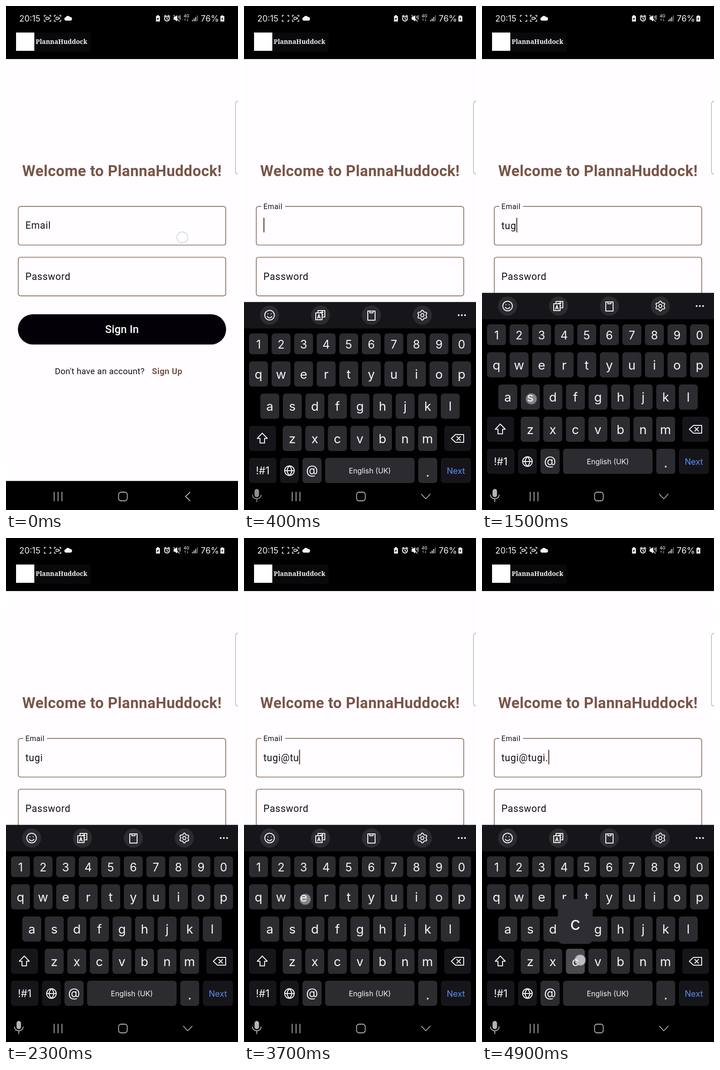
Animation, 508 px wide and 1102 px high, one loop 5000 ms. Source, as an HTML page:

```html
<!DOCTYPE html>
<html lang="en">
<head>
<meta charset="utf-8">
<title>Sign in</title>
<style>
  html, body { margin: 0; width: 100%; height: 100%; overflow: hidden; background: #000; }
  svg { display: block; width: 100vw; height: 100vh; font-family: Roboto, sans-serif; }
  .system { font-family: Inter, sans-serif; }
  .field { fill: none; stroke: #74543f; stroke-width: 1.4; }
  .body { font-size: 21.2px; letter-spacing: .66px; fill: #121014; }
  .small { font-size: 18.5px; letter-spacing: .33px; }
  .brown { fill: #795548; font-weight: 700; }
  .line { fill: none; stroke: #f2f2f4; stroke-width: 2; stroke-linecap: round; stroke-linejoin: round; }
  .nav { fill: none; stroke: #b4b4b6; stroke-width: 1.8; stroke-linecap: round; stroke-linejoin: round; }
  .mid { text-anchor: middle; }
</style>
</head>
<body>
<svg viewBox="0 0 508 1102" preserveAspectRatio="none">
  <rect width="508" height="1102" fill="#fffdff"/>
  <rect width="508" height="116"/>

  <!-- status bar -->
  <g class="system" fill="#f4f4f4">
    <text x="29" y="33.500" font-size="18.300">20:15</text>
    <path id="corners" d="M84 24v-3.500h3.500M94.500 20.500h3.500v3.500M98 30v3.500h-3.500M87.500 33.500h-3.500v-3.500" fill="none" stroke="#f4f4f4" stroke-width="1.5"/>
    <use href="#corners" x="22"/>
    <g id="blink">
      <g id="camera">
        <path d="M87.500 24.500h5v5h-5z" fill="none" stroke="#f4f4f4" stroke-width="1.4"/>
        <path d="M93 27l3-2.500v5z"/>
      </g>
    </g>
    <use href="#camera" x="22"/>
    <path d="M131 32a3.800 3.800 0 0 1 0-7.500a5 5 0 0 1 9-.5a4 4 0 0 1 1 8z"/>
    <path d="M328.500 22h2v-2h4v2h2.500v12h-8.500z"/>
    <path d="M330.500 29.500q0-3 4-4q0 5-4 4" fill="#000"/>
    <circle cx="352.500" cy="27.500" r="5.300" fill="none" stroke="#f4f4f4" stroke-width="2"/>
    <path d="M346 23l4-3M355 20l4 3M352.500 24v4l2.500 1.500" fill="none" stroke="#f4f4f4" stroke-width="1.700"/>
    <path d="M367 24h3l5-4v14l-5-4h-3z"/>
    <path d="M367 20l13 14M378 22v4M381 20v10" fill="none" stroke="#f4f4f4" stroke-width="1.5"/>
    <text x="389" y="25" font-size="8.800" font-weight="500">4G</text>
    <path d="M392.500 33v-5l-2 2M397 27.500v5l2-2" fill="none" stroke="#888" stroke-width="1.2"/>
    <path d="M407.500 30.500h1.800v3h-1.800zM411 27.500h1.800v6h-1.800zM414.500 24h1.800v9.500h-1.800z"/>
    <path d="M418 20.500h1.800v13h-1.800z" fill="#777"/>
    <text x="426.500" y="33.500" font-size="18.500">76%</text>
    <path d="M469.500 22h2v-1.500h4v1.500h2.500v12h-8.500z"/>
    <path d="M474.500 24l-3 4.500h2l-.7 3.500l3-4.500h-2z" fill="#000"/>
  </g>

  <!-- header -->
  <rect x="62" y="58" width="123" height="42" fill="#09080b"/>
  <rect x="22" y="58" width="40" height="40" fill="#fff"/>
  <text x="65" y="83" font-size="14" font-weight="600" fill="#f4f4f4" style="font-family:'Noto Serif',serif">PlannaHuddock</text>

  <rect x="502.500" y="208" width="20" height="160" rx="6" fill="#fff" stroke="#aaa8ac" stroke-width="1.3"/>

  <!-- form -->
  <text class="brown mid" x="254" y="372" font-size="33" letter-spacing=".4">Welcome to PlannaHuddock!</text>
  <rect class="field" x="26.800" y="438.300" width="454.400" height="84.300" rx="5"/>
  <rect class="field" x="26.800" y="549.400" width="454.400" height="84.300" rx="5"/>
  <rect id="notch" x="38" y="436" height="5" fill="#fffdff"/>
  <text id="label" class="body" x="42.500">Email</text>
  <text id="typed" class="body" x="42.500" y="488"></text>
  <rect id="caret" y="463" width="2.600" height="32" fill="#795548"/>
  <text class="body" x="42.500" y="598.500">Password</text>
  <rect x="27" y="676" width="454" height="66" rx="33" fill="#e4e2e5"/>
  <rect x="26" y="674" width="456" height="66" rx="33" fill="#030107"/>
  <text class="mid" x="254" y="715" font-size="23.800" font-weight="500" letter-spacing=".13" fill="#fff">Sign In</text>
  <text class="small" x="107" y="805" fill="#121014">Don't have an account?</text>
  <text class="small brown" x="319.500" y="805">Sign Up</text>

  <rect y="1038.500" width="508" height="64"/>
  <g id="keyboard" class="system"></g>

  <!-- navigation bar -->
  <g class="nav">
    <path d="M105.500 1063v19M114 1063v19M122.500 1063v19"/>
    <rect x="246.500" y="1063" width="19" height="19" rx="5.500"/>
    <path id="back" d="M403 1063l-10 9.500l10 9.500"/>
    <g id="mic">
      <rect x="24" y="1057" width="8" height="16" rx="4" fill="#b4b4b6"/>
      <path d="M18.500 1069a9.500 8.500 0 0 0 19 0M28 1078v6"/>
    </g>
  </g>
  <circle id="touch" r="12" fill="#fff" stroke="#8290b4" stroke-width="1.3"/>
</svg>
<script>
const LOOP = 5000, STEP = 100;
const DARK = '#16151a', KEY = '#2c2b30', PRESSED = '#4b4a4f', INK = '#f4f4f6';
const $ = id => document.getElementById(id);

function add(parent, tag, attrs, text) {
  const el = document.createElementNS('http://www.w3.org/2000/svg', tag);
  for (const name in attrs) el.setAttribute(name, attrs[name]);
  if (text) el.textContent = text;
  parent.append(el);
  return el;
}

const board = $('keyboard');
const keys = {};

function addKey(name, x, y, w, h, fill, size, baseline, color = INK) {
  const rect = add(board, 'rect', { x, y, width: w, height: h, rx: 6.5, fill });
  if (size) add(board, 'text', { x: x + w / 2, y: y + baseline, 'font-size': size, fill: color, class: 'mid' }, name);
  keys[name] = { rect, fill, cx: x + w / 2, y };
}

function addRow(letters, x, y, h, size, baseline) {
  [...letters].forEach((c, i) => addKey(c, x + i * 49.4, y, 41.5, h, KEY, size, baseline));
}

const icon = d => add(board, 'path', { d, class: 'line' });

function buildKeyboard() {
  add(board, 'rect', { y: 627.5, width: 508, height: 540 });
  add(board, 'rect', { y: 627.5, width: 508, height: 57.5, fill: DARK });
  for (const cx of [56, 167.5, 279, 390.5]) add(board, 'circle', { cx, cy: 656, r: 21, fill: KEY });
  for (const cx of [470, 477, 484]) add(board, 'circle', { cx, cy: 656, r: 2, fill: INK });

  // smile, translate, clipboard, gear
  icon('M45.500 656a10.500 10.500 0 1 1 21 0a10.500 10.500 0 1 1-21 0M51 659q5 6 10 0M52.500 653v.2M59.500 653v.2');
  icon('M162 650v-4h15v14h-4M157 651h14v15h-14zM161 663l3-8.500l3 8.500M162 660.500h4M167 650h6l-2-2M173 655l-2 2');
  icon('M271 647h16v20h-16zM275.500 647v4h7v-4');
  let gear = '';
  for (let i = 0; i < 48; i++) {
    const a = i * Math.PI / 24, r = 9.3 + 1.5 * Math.cos(6 * a);
    gear += `${i ? 'L' : 'M'}${390.5 + r * Math.sin(a)} ${656 - r * Math.cos(a)}`;
  }
  icon(gear + 'ZM387 656a3.500 3.500 0 1 1 7 0a3.500 3.500 0 1 1-7 0');

  addRow('1234567890', 11, 696, 45.5, 25.2, 32.5);
  addRow('qwertyuiop', 11, 757, 55, 27.6, 37.5);
  addRow('asdfghjkl', 35.7, 827.5, 55, 27.6, 37.5);
  addRow('zxcvbnm', 84.8, 898, 55, 27.6, 37.5);
  addKey('shift', 11, 898, 59, 55, DARK);
  addKey('erase', 438.5, 898, 58.5, 55, DARK);
  addKey('!#1', 11, 968, 60, 55, DARK, 22.5, 36);
  addKey('globe', 79, 968, 41, 55, DARK);
  addKey('@', 128, 968, 42, 55, KEY, 27, 36);
  addKey('English (UK)', 177.5, 968, 196, 55, KEY, 15.8, 34);
  addKey('.', 381.5, 968, 41.5, 55, KEY, 28, 41);
  addKey('Next', 431, 968, 66, 55, DARK, 18.2, 34.5, '#5c8ff7');

  icon('M40 914l-11 11.500h6v10h10v-10h6z');
  icon('M463 917h18v17h-18l-9-8.500zM466 921.500l8 8M474 921.500l-8 8');
  icon('M89 996a10.500 10.500 0 1 1 21 0a10.500 10.500 0 1 1-21 0M89.500 996h20M99.500 985.500q-10 10.500 0 21q10-10.500 0-21');
}
buildKeyboard();

const popup = add(board, 'g', {});
add(popup, 'rect', { x: -38, width: 76, height: 98, rx: 11, fill: '#2e2d32' });
const popupText = add(popup, 'text', { y: 67, 'font-size': 40, fill: INK, class: 'mid' });

// key, down, up, gone, touch x, touch y, typed character
const taps = [
  ['', 0, 0, 200, 386, 506, ''],
  ['t', 800, 1000, 1100, 239, 794, 't'],
  ['e', 1100, 1200, 1400, 134, 790, 'u'],
  ['s', 1400, 1500, 1700, 108, 859, 'g'],
  ['t', 1700, 1800, 2000, 225, 784, 'i'],
  ['@', 3100, 3100, 3300, 150, 992, '@'],
  ['t', 3400, 3500, 3600, 233, 789, 't'],
  ['e', 3600, 3700, 3800, 134, 790, 'u'],
  ['s', 3800, 3900, 4000, 109, 859, 'g'],
  ['t', 4000, 4100, 4300, 235, 789, 'i'],
  ['.', 4500, 4600, 4800, 404, 994, '.'],
  ['c', 4900, 5000, 5000, 215, 923, '']
].map(([key, down, up, gone, x, y, char]) => ({ key, down, up, gone, x, y, char }));

// one value per step while the keyboard opens
const opening = {
  slide: [480, 475, 270, 66, 20, 5, 0],
  label: [0, .3, .95, 1],
  turn: [0, 0, .5, 1],
  mic: [0, 0, .3, .6, .8, .9, 1]
};
const stepOf = (name, i) => opening[name][Math.min(i, opening[name].length - 1)];
const show = (el, on) => el.setAttribute('visibility', on ? 'visible' : 'hidden');

function drawTap(t) {
  const tap = taps.find(p => p.down <= t && t < p.gone);
  const held = tap && t < tap.up;
  for (const name in keys) {
    keys[name].rect.setAttribute('fill', held && name === tap.key ? PRESSED : keys[name].fill);
  }
  show(popup, held);
  if (held) {
    const key = keys[tap.key];
    popup.setAttribute('transform', `translate(${key.cx} ${key.y - 108.5})`);
    popupText.textContent = tap.key;
  }
  show($('touch'), tap);
  if (tap) {
    $('touch').setAttribute('cx', tap.x);
    $('touch').setAttribute('cy', tap.y);
    $('touch').setAttribute('opacity', held ? .64 : t - tap.up < STEP ? .43 : .25);
  }
}

function drawInput(t) {
  const done = taps.filter(p => p.char && p.up <= t);
  const lastEdit = done.length ? done[done.length - 1].up : 300;
  $('typed').textContent = done.map(p => p.char).join('');
  const width = done.length ? $('typed').getComputedTextLength() : 0;
  $('caret').setAttribute('x', 42.3 + width);
  show($('caret'), t >= 300 && Math.floor((t - lastEdit) / 500) % 2 === 0);
}

function draw(now) {
  const i = Math.floor(now % LOOP / STEP), t = i * STEP;
  board.setAttribute('transform', `translate(0 ${stepOf('slide', i)})`);
  const float = stepOf('label', i);
  $('label').setAttribute('transform', `translate(42.5 ${487 - 43.5 * float}) scale(${1 - .25 * float}) translate(-42.5 0)`);
  $('notch').setAttribute('width', 52 * float);
  $('back').setAttribute('transform', `rotate(${-90 * stepOf('turn', i)} 398 1072.5)`);
  $('mic').setAttribute('opacity', stepOf('mic', i));
  show($('blink'), (t + 700) % 1000 >= 500);
  drawInput(t);
  drawTap(t);
}

const start = performance.now();
function tick() {
  draw(performance.now() - start);
  requestAnimationFrame(tick);
}
tick();
</script>
</body>
</html>
```
